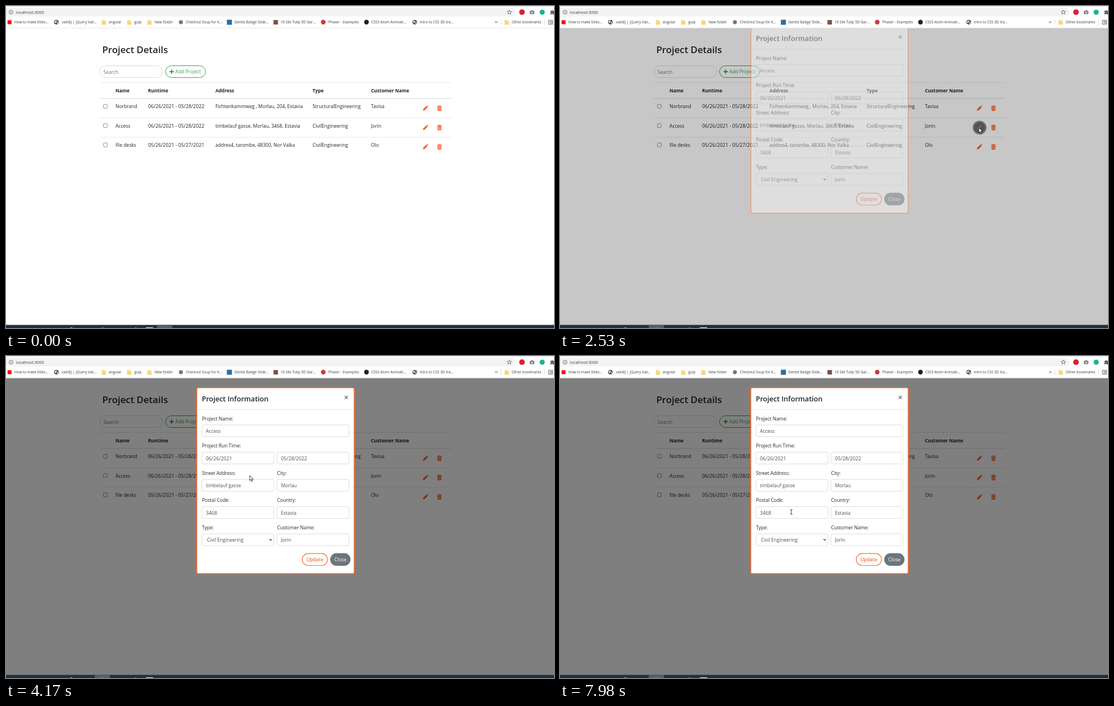
These frames come from a looping animation (976 px wide and 574 px high, 8000 ms). An HTML page:

```html
<!DOCTYPE html>
<html lang="en">
<head>
<meta charset="utf-8">
<title>Project Details</title>
<style>
html, body { margin: 0; width: 100%; height: 100%; overflow: hidden; background: #fff; }
svg { display: block; }
text { font: 8.5px "Open Sans", "Noto Sans", sans-serif; fill: #212529; white-space: pre; }
.title { font-size: 16.8px; font-weight: 600; }
.head text { font-size: 8.4px; font-weight: 700; }
.date { font-size: 8.75px; }
.marks text { font-size: 6.4px; fill: #3c4043; }
.url { font-size: 7.4px; fill: #3c4043; }
.hint { fill: #6c757d; }
.value { fill: #495057; }
.line { stroke: #dee2e6; }
.box { fill: #fff; stroke: #ced4da; }
.thin { fill: none; stroke: #5f6368; }

.anim { animation: 8s step-end infinite; }
#ring { animation-name: ring; }
#backdrop { animation-name: backdrop; }
#modal { animation-name: modal; }
#task { animation-name: task; }
#cursor { animation-name: travel; }
#arrow { animation-name: arrow; }
#beam { animation-name: beam; }

@keyframes ring {
  0% { opacity: 0 } 28.625% { opacity: .5 } 29.75% { opacity: 1 } 32.75%, 100% { opacity: 0 }
}
@keyframes task {
  0% { transform: translateX(269px) } 28.625%, 100% { transform: translateX(158px) }
}
@keyframes backdrop {
  0% { opacity: 0 } 31.625% { opacity: .22 } 32.75% { opacity: .44 } 33.75%, 100% { opacity: .5 }
}
@keyframes modal {
  0% { opacity: 0; transform: translateY(-28px) }
  31.625% { opacity: .42; transform: translateY(-18.6px) }
  32.75% { opacity: .88; transform: translateY(-9px) }
  33.75% { opacity: 1; transform: translateY(-3.5px) }
  34.625% { opacity: 1; transform: translateY(-1px) }
  35.625%, 100% { opacity: 1; transform: none }
}
@keyframes travel {
  0% { transform: translate(-30px, -30px) }
  3.25% { transform: translate(940px, 558px); animation-timing-function: steps(5) }
  8.25% { transform: translate(800px, 330px); animation-timing-function: steps(5) }
  13.25% { transform: translate(721px, 242px) }
  14.125% { transform: translate(725px, 239px); animation-timing-function: steps(3) }
  17% { transform: translate(752px, 206px); animation-timing-function: steps(4) }
  21% { transform: translate(747px, 219px) }
  23.875% { transform: translate(746px, 220px) }
  24.875% { transform: translate(742px, 219px) }
  25.875% { transform: translate(746px, 217px) }
  37.875% { transform: translate(735px, 225px); animation-timing-function: steps(4) }
  41.5% { transform: translate(610px, 320px); animation-timing-function: steps(5) }
  46.375% { transform: translate(435px, 214px) }
  52.125% { transform: translate(434px, 213px) }
  56.125% { transform: translate(430px, 200px); animation-timing-function: steps(2) }
  58% { transform: translate(419px, 165px); animation-timing-function: steps(2) }
  60% { transform: translate(427.5px, 127px) }
  62.125% { transform: translate(427.5px, 128px) }
  63% { transform: translate(427.5px, 130px) }
  63.75% { transform: translate(427.5px, 132px) }
  66.125% { transform: translate(427px, 134px) }
  67.75% { transform: translate(425.5px, 138px); animation-timing-function: steps(5) }
  72% { transform: translate(404px, 190px); animation-timing-function: steps(4) }
  75.625% { transform: translate(430px, 236px) }
  76.625% { transform: translate(431px, 235px); animation-timing-function: steps(6) }
  82.5% { transform: translate(437px, 229px) }
  87.375% { transform: translate(436px, 231px); animation-timing-function: steps(5) }
  92% { transform: translate(518px, 250px); animation-timing-function: steps(5) }
  96.875% { transform: translate(446.5px, 272px) }
  98.125% { transform: translate(440px, 274px) }
  99% { transform: translate(425px, 276px) }
  99.75%, 100% { transform: translate(412px, 278px) }
}
@keyframes arrow {
  0%, 68.6%, 72.9%, 90.15% { opacity: 1 }
  60%, 71.15%, 74.7%, 96.875%, 100% { opacity: 0 }
}
@keyframes beam {
  0%, 68.6%, 72.9%, 90.15% { opacity: 0 }
  60%, 71.15%, 74.7%, 96.875%, 100% { opacity: 1 }
}
</style>
</head>
<body>
<svg width="976" height="574" viewBox="0 0 976 574">
<defs>
  <g id="folder"><path d="M0 .8Q0 0 .8 0H3L4 1H6.7Q7.5 1 7.5 1.8V8H0Z" fill="#fbd775"/><path d="M0 7.6H7.5" stroke="#e8bd52" stroke-width=".6"/></g>
  <g id="globe"><circle r="4.1" fill="#4d5156"/><path d="M-3-1Q-1.5-3 0-2.6L1-1-1 0-.6 1.6-2.4 1ZM1.2.4 3.2-.6 2.8 1.6 1 3Z" fill="#fff"/></g>
  <g id="pencil" fill="#ff5a24"><path d="M-4.5 4.5-3.8 1.5 1.4-3.7 3.7-1.4-1.5 3.8Z"/><path d="M2-4.2 2.8-4.8Q3.3-5 3.8-4.6L4.7-3.7Q5-3.2 4.7-2.7L4.1-2Z"/></g>
  <g id="trash"><path d="M-4-4.2H-1.7L-1.2-4.9H1.2L1.7-4.2H4V-3H-4ZM-3.5-2.4H3.5L3.2 4Q3.1 4.8 2.3 4.8H-2.3Q-3.1 4.8-3.2 4Z" fill="#ff5a24"/><path d="M-1.6-1V3.4M0-1V3.4M1.6-1V3.4" stroke="#fff" stroke-width=".6"/></g>
  <g id="tools">
    <rect x="173.6" y="-6.9" width="6.8" height="6.8" rx="1.2" fill="#fff" stroke="#767676" stroke-width=".8"/>
    <use href="#pencil" x="747"/><use href="#trash" x="772"/>
  </g>
  <rect id="half" class="box" y="11.6" width="128" height="21" rx="2.2" stroke-width=".8"/>
</defs>

<rect width="976" height="574" fill="#fff"/>

<!-- page -->
<text class="title" x="171.5" y="84.4">Project Details</text>
<rect class="box" x="167" y="106.5" width="112" height="21" rx="10.5" stroke-width=".8"/>
<text class="hint" x="173.5" y="120.8">Search</text>
<rect x="284.2" y="106.5" width="71.2" height="21" rx="10.5" fill="#fff" stroke="#36a550"/>
<path d="M295 113.2V120.8M291.2 117H298.8" stroke="#28a745" stroke-width="2"/>
<text x="301.5" y="120.3" style="fill:#36a550">Add Project</text>
<path class="line" d="M167 136.5H793M167 199.5H793M167 234H793" stroke-width=".8"/>
<path class="line" d="M167 164.9H793" stroke-width="1.3"/>
<g class="head" transform="translate(0 154.2)">
  <text x="195">Name</text><text x="253">Runtime</text><text x="373">Address</text><text x="546">Type</text><text x="650">Customer Name</text>
</g>
<g transform="translate(0 182.3)">
  <use href="#tools"/>
  <text x="195">Norbrand</text><text class="date" x="253">06/26/2021 - 05/28/2022</text>
  <text x="373">Fichtenkammweg , Morlau, 204, Estavia</text><text x="546">StructuralEngineering</text><text x="650">Tavisa</text>
</g>
<circle id="ring" class="anim" cx="747.3" cy="216.8" r="11.2" fill="#626b74" stroke="#8f969c" stroke-width="2.4"/>
<g transform="translate(0 216.7)">
  <use href="#tools"/>
  <text x="195">Access</text><text class="date" x="253">06/26/2021 - 05/28/2022</text>
  <text x="373">timbelauf gasse, Morlau, 3468, Estavia</text><text x="546">CivilEngineering</text><text x="650">Jorin</text>
</g>
<g transform="translate(0 251.1)">
  <use href="#tools"/>
  <text x="195">file desks</text><text class="date" x="253">05/26/2021 - 05/27/2021</text>
  <text x="373">addres4, tarombe, 48300, Nor Valka</text><text x="546">CivilEngineering</text><text x="650">Olo</text>
</g>

<rect id="backdrop" class="anim" y="39" width="976" height="535"/>

<!-- dialog -->
<g id="modal" class="anim">
  <rect x="339.8" y="56.5" width="280.4" height="331.6" rx="2.5" fill="#fff" stroke="#ff6a21" stroke-width="1.5"/>
  <text x="348.7" y="81" style="font-size:12.6px;font-weight:600">Project Information</text>
  <path d="M603.3 71.2 608.7 76.6M608.7 71.2 603.3 76.6" stroke="#666" stroke-width="1.3"/>
  <path class="line" d="M340.5 95.3H619.5" stroke-width=".8"/>
  <g transform="translate(349 111.2)">
    <text y="3.3">Project Name:</text>
    <rect class="box" y="11.6" width="261.6" height="21" rx="2.2" stroke-width=".8"/>
    <text class="value" x="7" y="25.8">Access</text>
  </g>
  <g transform="translate(349 159.8)">
    <text y="3.3">Project Run Time:</text><use href="#half"/><text class="value date" x="7" y="25.8">06/26/2021</text>
  </g>
  <g transform="translate(482.7 159.8)">
    <use href="#half"/><text class="value date" x="7" y="25.8">05/28/2022</text>
  </g>
  <g transform="translate(349 208.4)">
    <text y="3.3">Street Address:</text><use href="#half"/><text class="value" x="7" y="25.8">timbelauf gasse</text>
  </g>
  <g transform="translate(482.7 208.4)">
    <text y="3.3">City:</text><use href="#half"/><text class="value" x="7" y="25.8">Morlau</text>
  </g>
  <g transform="translate(349 257)">
    <text y="3.3">Postal Code:</text><use href="#half"/><text class="value date" x="7" y="25.8">3468</text>
  </g>
  <g transform="translate(482.7 257)">
    <text y="3.3">Country:</text><use href="#half"/><text class="value" x="7" y="25.8">Estavia</text>
  </g>
  <g transform="translate(349 305.5)">
    <text y="3.3">Type:</text><use href="#half"/><text class="value" x="9" y="25.8">Civil Engineering</text>
    <path d="M120.3 20.8 122.5 23 124.7 20.8" fill="none" stroke="#333" stroke-width="1.2"/>
  </g>
  <g transform="translate(482.7 305.5)">
    <text y="3.3">Customer Name:</text><use href="#half"/><text class="value" x="7" y="25.8">Jorin</text>
  </g>
  <rect x="527.6" y="352.2" width="45" height="21.3" rx="10.6" fill="#fff" stroke="#ff6a35" stroke-width="1.2"/>
  <text x="550" y="366.3" text-anchor="middle" style="font-weight:600;fill:#ff6a35">Update</text>
  <rect x="577.4" y="351.6" width="36.2" height="22.4" rx="11.2" fill="#6c757d"/>
  <text x="595.5" y="366.3" text-anchor="middle" style="fill:#fff">Close</text>
</g>

<!-- browser bars -->
<rect width="976" height="39" fill="#fff"/>
<rect width="976" height="1.2" fill="#dee1e6"/>
<rect x="-10" y="3" width="917" height="15.5" rx="7.7" fill="#f1f3f4"/>
<path d="M0 39.3H976" stroke="#e1e3e6" stroke-width=".8"/>
<circle class="thin" cx="9" cy="11" r="3.5" stroke-width=".9"/>
<path d="M9 10.4V13M9 8.8V9.6" stroke="#5f6368" stroke-width=".9"/>
<text class="url" x="17.8" y="13.7">localhost:3000</text>
<path class="thin" d="M896.5 7 897.6 9.6 900.4 9.8 898.3 11.6 899 14.4 896.5 12.9 894 14.4 894.7 11.6 892.6 9.8 895.4 9.6Z" stroke-width=".9"/>
<circle cx="919" cy="11" r="5" fill="#df1f2d"/>
<path d="M933 8.7H935L936 7.4H938.2L939.2 8.7H941V14.6H933Z" fill="#777c80"/>
<circle cx="937" cy="11.6" r="1.9" fill="#fff"/><circle cx="937" cy="11.6" r="1.1" fill="#777c80"/>
<circle cx="955" cy="11" r="4.6" fill="#15b493"/>
<path d="M969.5 8.6H971.3A1.4 1.4 0 0 1 974 8.6H976V15H973.8A1.4 1.4 0 0 0 971.2 15H969.5V12.8A1.3 1.3 0 0 0 969.5 10.4Z" fill="#5f6368"/>
<g class="marks" transform="translate(0 31)">
  <rect x="2.8" y="-5.6" width="7" height="7" fill="#f00"/><text x="15">How to make titles...</text>
  <use href="#globe" x="89.8" y="-2.2"/><text x="98">.valid() | jQuery Vali...</text>
  <use href="#folder" x="170.7" y="-6"/><text x="183">angular</text>
  <use href="#folder" x="215.7" y="-6"/><text x="228.5">gulp</text>
  <use href="#folder" x="251.8" y="-6"/><text x="264.5">New folder</text>
  <circle cx="311.5" cy="-2.2" r="3.6" fill="#777"/><text x="320.3">Chestnut Soup for K...</text>
  <rect x="393.4" y="-6.5" width="9" height="9" fill="#2b6ca3"/><text x="406.5">Gentle Badge Slide...</text>
  <rect x="476.4" y="-6" width="8" height="8" fill="#765548"/><text x="489">16 Silk Tulip 5D Gar...</text>
  <circle cx="565" cy="-2.2" r="4.2" fill="#c83c46"/><text x="574">Phaser - Examples</text>
  <circle cx="642" cy="-2.2" r="4.2" fill="#222"/><text x="650.5">CSS3 Atom Animati...</text>
  <use href="#globe" x="728" y="-2.2"/><text x="737">Intro to CSS 3D tra...</text>
  <path d="M871-4 872.7-2.3 871-.6M873.6-4 875.3-2.3 873.6-.6" fill="none" stroke="#444" stroke-width=".9"/>
  <path d="M881.5-7V3M959-7V3" stroke="#d0d3d7" stroke-width=".8"/>
  <use href="#folder" x="888" y="-6"/><text x="900.8">Other bookmarks</text>
  <path class="thin" d="M966-5.6H973.6V1.6H966ZM967.4-3.6H968.4M969.2-3.6H972.6M967.4-2H968.4M969.2-2H972.6M967.4-.4H968.4M969.2-.4H972.6" stroke-width=".9"/>
</g>

<!-- taskbar -->
<rect y="568.5" width="976" height="5.5" fill="#1d3042"/>
<rect id="task" class="anim" y="568.5" width="27" height="5.5" fill="#52616d"/>
<path d="M114 574Q116.5 571.6 119 574M169 574Q172 572.4 175 574M229 574Q231 572 233 574" fill="#9aa6ae"/>
<path d="M249 573.4H262" stroke="#dfe5e9" stroke-width="1.2"/>

<g id="cursor" class="anim">
  <path id="arrow" class="anim" d="M0 0V9L2.1 7.1 3.6 10.6 5 10 3.5 6.6H6.4Z" fill="#fff" stroke="#111" stroke-width=".8"/>
  <path id="beam" class="anim" d="M-2-4.2Q0-4.2 0-3.2Q0-4.2 2-4.2M0-3.4V3.4M-2 4.2Q0 4.2 0 3.2Q0 4.2 2 4.2" fill="none" stroke="#222" stroke-width=".9"/>
</g>
</svg>
</body>
</html>
```
